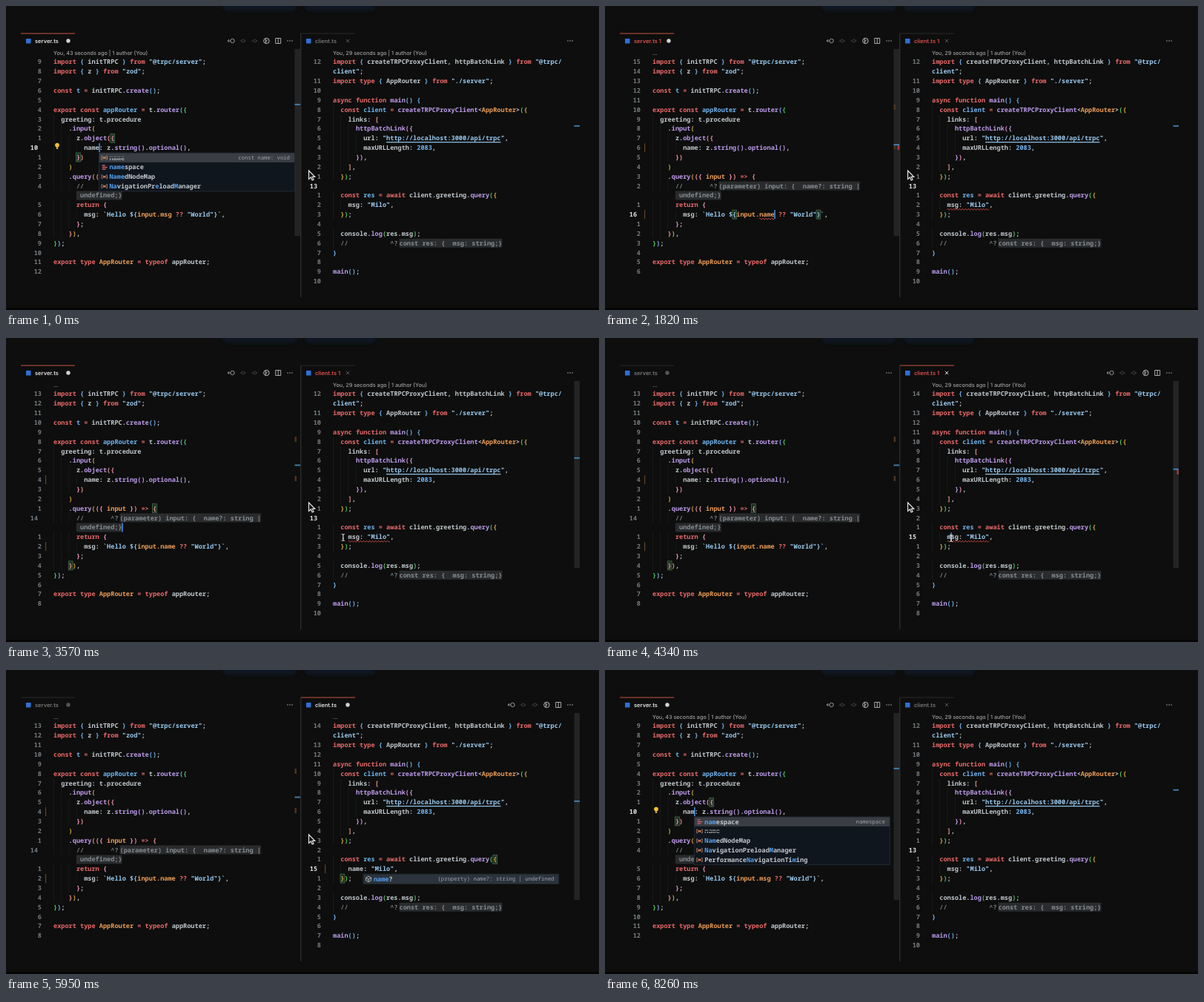
These frames come from a looping animation (800 by 410 pixels, 8330 ms). An HTML page:

```html
<!DOCTYPE html>
<html lang="en">
<head>
<meta charset="utf-8">
<title>Typed rename</title>
<style>
html, body { margin: 0; width: 100%; height: 100%; overflow: hidden; background: #0d0e0d; }
svg { display: block; width: 800px; height: 410px; }
text { white-space: pre; text-rendering: geometricPrecision; }
.code { font: 700 8.58px "Noto Sans Mono", "DejaVu Sans Mono", monospace; }
.small { font: 500 7.27px "Noto Sans Mono", "DejaVu Sans Mono", monospace; }
.ui { font: 500 7.25px Inter, Roboto, sans-serif; }
.tab { font: 600 7.5px Inter, Roboto, sans-serif; }
</style>
</head>
<body>
<svg viewBox="0 0 800 410">
  <defs><filter id="soft" x="-20%" y="-80%" width="140%" height="260%"><feGaussianBlur stdDeviation="2.5"/></filter></defs>
  <rect width="800" height="410" fill="#0d0e0d"/>
  <g fill="#0b1820" filter="url(#soft)">
    <rect x="293" y="-12" width="99" height="19" rx="5"/>
    <rect x="404" y="-12" width="94" height="19" rx="5"/>
  </g>
  <rect y="407" width="800" height="3" fill="#060606"/>
  <rect x="397" y="37" width="1.4" height="356" fill="#2c2c2c"/>
  <g id="screen"></g>
  <path id="arrow" transform="translate(408.5 222)" d="M0 0V11.5L2.8 9 4.6 13 6.5 12.2 4.8 8.4H8.2Z" fill="#111" stroke="#e6e6e6" stroke-width="1.2"/>
  <path id="beam" d="M-2-4.5Q0-4.5 0-3Q0-4.5 2-4.5M0-3V3M-2 4.5Q0 4.5 0 3Q0 4.5 2 4.5M-1 1H1" fill="none" stroke="#ddd" stroke-width="1.1"/>
</svg>
<script>
const LOOP = 8330, CH = 5.148, LH = 12.86;
const C = {
  fg: '#c0c6cc', key: '#e8686a', str: '#98c8ee', fn: '#bd9aea', blue: '#70b2ee',
  orange: '#ec9c56', dim: '#747a80', red: '#e04f4d', accent: '#4a9eff'
};
const BRACKETS = ['#70b2ee', '#52c45f', '#d4a83c', '#ee978f', '#ee90bf', '#c49ceb'];
const PANES = {
  L: { x: 64, num: 48, cur: 38, tab: 20, mark: 389.5, tools: 304, file: 'server.ts' },
  R: { x: 441, num: 425, cur: 415, tab: 398, mark: 766.5, tools: 682, file: 'client.ts' }
};
const $ = id => document.getElementById(id);
const baseY = row => 78.4 + row * LH;
const midY = row => baseY(row) - 3;
const colX = (pane, col) => PANES[pane].x + col * CH;
const esc = s => s.replace(/&/g, '&amp;').replace(/</g, '&lt;').replace(/>/g, '&gt;');
const text = (x, y, s, fill, cls = 'code', extra = '') =>
  `<text x="${x}" y="${y}" fill="${fill}" class="${cls}" ${extra}>${esc(s)}</text>`;
const rect = (x, y, w, h, fill, extra = '') =>
  `<rect x="${x}" y="${y}" width="${w}" height="${h}" fill="${fill}" ${extra}/>`;
const path = (d, stroke, width = 1) =>
  `<path d="${d}" fill="none" stroke="${stroke}" stroke-width="${width}"/>`;
const dot = (x, y, r, fill) => `<circle cx="${x}" cy="${y}" r="${r}" fill="${fill}"/>`;

const serverCode = s => [
  'import { initTRPC } from "@trpc/server";',
  'import { z } from "zod";',
  '',
  'const t = initTRPC.create();',
  '',
  'export const appRouter = t.router({',
  '  greeting: t.procedure',
  '    .input(',
  '      z.object({',
  `        ${s.prop}: z.string().optional(),`,
  '      })',
  '    )',
  '    .query(({ input }) => {',
  '      //       ^?',
  '',
  '      return {',
  `        msg: \`Hello \${input.${s.tpl} ?? "World"}\`,`,
  '      };',
  '    }),',
  '});',
  '',
  'export type AppRouter = typeof appRouter;',
  ''
];
const clientCode = s => [
  'import { createTRPCProxyClient, httpBatchLink } from "@trpc/',
  'client";',
  'import type { AppRouter } from "./server";',
  '',
  'async function main() {',
  '  const client = createTRPCProxyClient<AppRouter>({',
  '    links: [',
  '      httpBatchLink({',
  '        url: "http://localhost:3000/api/trpc",',
  '        maxURLLength: 2083,',
  '      }),',
  '    ],',
  '  });',
  '',
  '  const res = await client.greeting.query({',
  `    ${s.key}: "Milo",`,
  '  });',
  '',
  '  console.log(res.msg);',
  '  //           ^?',
  '}',
  '',
  'main();',
  ''
];

const TOKENS = new RegExp([
  '(?<str>^client"|"[^"]*"?|`Hello \\$\\{|\\}`)',
  '(?<dim>\\/\\/|\\^\\?)',
  '(?<key>\\b(?:import|from|export|const|type|typeof|return|async|function|await)\\b|=>|\\?\\?|=)',
  '(?<blue>(?<=const )\\w+|\\b\\d+)',
  '(?<orange>(?<=<|export type )\\w+|(?<![.\\w])input\\b(?:\\.\\w*)?)',
  '(?<fn>\\w+(?=[(<]))',
  '(?<bracket>[()[\\]{}])',
  '(?<fg>\\w+|.)'
].join('|'), 'g');

function highlight(lines, pane) {
  let depth = 0;
  return lines.map((line, row) => {
    const indent = line.search(/\S|$/);
    let guides = '', spans = '';
    for (let c = 0; c < indent; c += 2)
      guides += rect(colX(pane, c), midY(row) - LH / 2, .6, LH, '#222322');
    for (const m of line.slice(indent).matchAll(TOKENS)) {
      const kind = Object.keys(m.groups).find(k => m.groups[k] !== undefined);
      let color = C[kind];
      if (kind === 'bracket') {
        const opens = '([{'.includes(m[0]);
        if (!opens) depth--;
        color = BRACKETS[depth % BRACKETS.length];
        if (opens) depth++;
      }
      spans += `<tspan fill="${color}">${esc(m[0])}</tspan>`;
    }
    return guides + `<text class="code" x="${colX(pane, indent)}" y="${baseY(row)}">${spans}</text>`;
  }).join('');
}

function lineNumbers(pane, rows, current) {
  const wrapped = pane === 'L' ? 14 : 1;
  const absolute = row => row < wrapped ? row + 1 : row;
  let out = '';
  for (let row = 0; row < rows; row++) {
    if (row === wrapped) continue;
    const p = PANES[pane], here = row === current;
    const n = here ? absolute(row) : Math.abs(absolute(row) - absolute(current));
    const bright = here && !(pane === 'L' && row === 13);
    out += text(here ? p.cur : p.num, baseY(row), String(n), bright ? '#e0e0e0' : C.dim, 'code',
      `text-anchor="${here ? 'middle' : 'end'}"`);
  }
  return out;
}

function toolbar(x, active) {
  const at = i => x + i * 15.8, y = 47;
  let out = [-3, 0, 3].map(d => dot(at(5) + d, y, .8, '#a5a5a5')).join('');
  if (!active) return out;
  const ring = (cx, r, color) => `<circle cx="${cx}" cy="${y}" r="${r}" fill="none" stroke="${color}"/>`;
  out += ring(at(0) + 1.5, 2.7, '#999') + path(`M${at(0) - 5} ${y}h4m-2-2l-2 2 2 2`, '#999', .9);
  for (const i of [1, 2]) out += ring(at(i), 2, '#404040') + path(`M${at(i) - 4} ${y}h2m4 0h2`, '#404040');
  out += ring(at(3), 3.7, '#bbb') + path(`M${at(3) - 1} ${y - 3}v6m0-2l2.5-2.5`, '#bbb');
  return out + path(`M${at(4) - 3.5} ${y - 3.5}h7v7h-7zm3.5 0v7`, '#aaa');
}

function tab(pane, s) {
  const p = PANES[pane], active = s.active === pane;
  const err = pane === 'L' ? s.lErr : s.rErr, dirty = pane === 'L' ? s.lDirty : s.rDirty;
  const color = err ? C.red : active ? '#e4e4e4' : '#777', mark = active ? '#d4d4d4' : '#555';
  const cx = p.tab + (pane === 'L' ? 64 : 63) + (err && dirty ? 2 : 0);
  return rect(p.tab, 36.5, 73, 1.2, active ? '#a8483b' : '#242424') +
    rect(p.tab + 7, 44, 6.5, 6.5, '#2f6fd8') +
    text(p.tab + 19, 50, p.file + (err ? ' 1' : ''), color, 'tab') +
    (dirty ? dot(cx, 47, 2.7, mark) : path(`M${cx - 2.2} 44.8l4.4 4.4m0-4.4l-4.4 4.4`, mark)) +
    toolbar(p.tools, active);
}

function overview(pane, s) {
  const p = PANES[pane], left = pane === 'L';
  const y = left ? 132.8 + ((s.lCur === 13 ? 14 : s.lCur) - 9) * 7.75 : 161.8 + (s.rCur - 13) * 7.6;
  let out = s.hover === pane ? rect(p.mark, 58, 7.5, 252, '#232425') : '';
  if (left && s.lEdited) out += rect(p.mark, 133, 2.5, 7, '#4d3320') + rect(p.mark, 186, 2.5, 7, '#4d3320');
  if (left ? s.lErr : s.rErr && s.rCur === 15) out += rect(p.mark + 5, y, 2.5, 7, '#a33a38');
  return out + rect(p.mark, y - .9, 7.5, 1.8, '#4283b6');
}

const squiggle = (pane, row, from, to) => {
  const n = Math.round((to - from) * CH / 4);
  return path(`M${colX(pane, from)} ${baseY(row) + 3}` + 'q1-2 2 0t2 0'.repeat(n), C.red, 1);
};

function hint(pane, row, x, s) {
  return rect(x, midY(row) - 6, s.length * CH, 12, '#292b2d', 'rx="1"') + text(x, baseY(row), s, '#868b90');
}

// Matching bracket cells: [pane, row, column]
const MATCHES = {
  obj: () => [['L', 8, 15], ['L', 10, 6]],
  tpl: s => [['L', 16, 21], ['L', 16, 39 + s.tpl.length]],
  query: () => [['L', 12, 26], ['L', 18, 4]],
  res: () => [['R', 14, 42], ['R', 16, 2]],
  main: () => [['R', 4, 22], ['R', 20, 0]]
};
// "~" strikes a label, brackets mark the matched letters
const MENUS = {
  full: { detail: 'const name: void', rows: ['~name', '[name]space', '[Name]dNodeMap', '[Na]vigationPr[e]load[M]anager'] },
  part: { detail: 'namespace', rows: ['[nam]espace', '~name', '[Nam]edNodeMap', '[Na]vigationPreload[M]anager', 'Performance[Na]vigationTi[m]ing'] },
  prop: { detail: '(property) name?: string | undefined', rows: ['[name]?'] }
};

function menuIcon(x, y, label, kind) {
  if (kind === 'prop') return path(`M${x - 3.5} ${y - 1.5}l3.5-2 3.5 2v3.5l-3.5 2-3.5-2zl3.5 2 3.5-2m-3.5 2v3.5`, '#bbb', .9);
  if (label.endsWith('space')) return path(`M${x - 3} ${y - 2.5}h4m-4 2.5h7m-7 2.5h5`, '#c66', 1.4);
  return path(`M${x - 2.5} ${y - 2.5}h-1.2v5h1.2m5-5h1.2v5h-1.2`, '#a5887c', .9) +
    path(`M${x - 2} ${y + 1.3}l4-2.6m-4 0l4 2.6`, '#d97a4a', 1.4);
}

function menu(s) {
  const [pane, row, col] = s.caret || ['R', 15, 8];
  const { rows, detail } = MENUS[s.menu];
  const x = colX(pane, col) - .3, top = midY(row + 1) - 6, w = 264;
  let out = rect(x, top, w, rows.length * LH + .5, '#10161e', 'stroke="#282d34" stroke-width=".8"') +
    rect(x + .5, top + .5, w - 1, LH - .5, s.menu === 'prop' ? '#2b333d' : '#3a3e44');
  rows.forEach((label, i) => {
    const y = top + i * LH + 9.6, struck = label[0] === '~';
    const spans = label.replace('~', '').split(/[[\]]/).map((part, k) =>
      `<tspan fill="${k % 2 ? '#559fee' : C.fg}">${part}</tspan>`).join('');
    out += menuIcon(x + 7.2, y - 3, label, s.menu) +
      `<text class="code" x="${x + 14}" y="${y}"${struck ? ' text-decoration="line-through" opacity=".75"' : ''}>${spans}</text>`;
  });
  return out + text(x + 257.5, top + 9, detail, '#a0a4a9', 'small', 'text-anchor="end"');
}

function draw(s) {
  const left = serverCode(s), right = clientCode(s);
  let out = '';
  for (const pane of 'LR') out += tab(pane, s) + overview(pane, s);
  out += text(64, 66, s.lHead, '#a0a0a0', 'ui') + text(441, 66, s.rHead, '#a0a0a0', 'ui');
  out += lineNumbers('L', left.length, s.lCur) + lineNumbers('R', right.length, s.rCur);
  for (const [pane, row, col] of MATCHES[s.match](s))
    out += rect(colX(pane, col) - .3, midY(row) - 6, CH + .6, 12, '#1b2f20', 'stroke="#476b4c" stroke-width=".8"');
  out += highlight(left, 'L') + highlight(right, 'R');
  out += hint('L', 13, colX('L', 17) + 2, `(parameter) input: {  ${s.hint}?: string |`) +
    hint('L', 14, colX('L', 6), ' undefined;}') +
    hint('R', 19, colX('R', 17) + 2, 'const res: {  msg: string;}');
  out += rect(colX('R', 14), baseY(8) + 1.8, 30 * CH, 1.2, C.str);
  if (s.lEdited) out += rect(53, midY(9) - 6, 1.2, 12, '#66432a');
  if (s.lEdited && s.tpl !== 'msg') out += rect(53, midY(16) - 6, 1.2, 12, '#66432a');
  if (s.rDirty) out += rect(430, midY(15) - 6, 1.2, 12, '#66432a');
  if (s.lErr) out += squiggle('L', 16, 28, 28 + Math.max(1, s.tpl.length));
  if (s.rErr) out += squiggle('R', 15, 4, 12 + s.key.length);
  if (s.blame) out += text(colX('R', 6), baseY(13), 'You, 5 minutes ago • Initial Commit', '#4b4e50');
  if (s.bulb) out += dot(69, 187.6, 2.9, '#f2c12e') + rect(67.8, 190, 2.4, 3, '#c9a24a');
  if (s.caret) {
    const [pane, row, col] = s.caret;
    out += rect(colX(pane, col) - .4, midY(row) - 6, 1.4, 12, C.accent);
  }
  return out + (s.menu ? menu(s) : '');
}

const blame = seconds => `You, ${seconds} seconds ago | 1 author (You)`;
const typing = (start, gap, word, make) =>
  [...word].map((_, i) => [start + i * gap, make(word.slice(0, i + 1))]);

const STEPS = [
  [0, {
    active: 'L', hover: 'L', prop: 'name', tpl: 'msg', hint: 'msg', key: 'msg', lCur: 9, rCur: 13,
    lHead: blame(43), rHead: blame(29), lErr: false, rErr: false, lDirty: true, rDirty: false,
    lEdited: false, caret: ['L', 9, 12], match: 'obj', menu: 'full', bulb: true, blame: false, arrow: true
  }],
  [420, { menu: null, bulb: false, hint: 'name', lHead: '…', lEdited: true }],
  [560, { lErr: true, rErr: true }],
  [1050, { lCur: 16, caret: ['L', 16, 29], match: 'tpl' }],
  [1400, { tpl: '', caret: ['L', 16, 28] }],
  ...typing(1470, 70, 'name', tpl => ({ tpl, caret: ['L', 16, 28 + tpl.length] })),
  [1960, { lErr: false }],
  [2240, { lCur: 13, caret: ['L', 14, 18], match: 'query' }],
  [3500, { hover: 'R' }],
  [3710, { active: 'R', rCur: 15, caret: ['R', 15, 5] }],
  [4760, { key: '', caret: ['R', 15, 4], rDirty: true, rHead: '…', match: 'res' }],
  ...typing(4830, 140, 'name', key => ({ key, caret: ['R', 15, 4 + key.length], menu: 'prop' })),
  [5390, { rErr: false }],
  [5600, { caret: null }],
  [6650, {
    hover: 'L', prop: 'msg', tpl: 'msg', hint: 'msg', key: 'msg', lCur: 11, rCur: 13, lHead: blame(12),
    rHead: blame(29), lDirty: false, rDirty: false, lEdited: false, caret: ['R', 13, 0],
    match: 'main', menu: null, blame: true, arrow: false
  }],
  [7560, { active: 'L', lCur: 9, caret: ['L', 9, 11], match: 'obj', blame: false, lHead: blame(43) }],
  [7770, { prop: '', caret: ['L', 9, 8], lDirty: true, bulb: true }],
  ...typing(7840, 140, 'nam', prop => ({ prop, caret: ['L', 9, 8 + prop.length], menu: 'part' }))
];

const BEAM = [
  [630, 118, 196], [1000, 212, 281], [1900, 212, 281], [2200, 283, 254], [3200, 283, 254],
  [3640, 467, 270], [4690, 467, 270], [6650, 438, 242], [7280, 118, 196], [7770, 118, 196]
];
const BEAM_SHOWN = [[630, 1400], [1900, 4690], [6650, 7770]];

function beamAt(t) {
  if (!BEAM_SHOWN.some(([a, b]) => t >= a && t < b)) return null;
  const i = BEAM.findIndex(k => k[0] > t);
  const [t0, x0, y0] = BEAM[i - 1], [t1, x1, y1] = BEAM[i];
  const u = (t - t0) / (t1 - t0), e = u * u * (3 - 2 * u);
  return [x0 + (x1 - x0) * e, y0 + (y1 - y0) * e];
}

let shown = -1;
function render(t) {
  const count = STEPS.filter(([at]) => at <= t).length;
  if (count !== shown) {
    const state = Object.assign({}, ...STEPS.slice(0, count).map(step => step[1]));
    $('screen').innerHTML = draw(state);
    $('arrow').style.display = state.arrow ? '' : 'none';
    shown = count;
  }
  const pos = beamAt(t);
  $('beam').style.display = pos ? '' : 'none';
  if (pos) $('beam').setAttribute('transform', `translate(${pos[0]} ${pos[1]})`);
}

const start = performance.now();
function tick() {
  render((performance.now() - start) % LOOP);
  requestAnimationFrame(tick);
}
tick();
</script>
</body>
</html>
```
